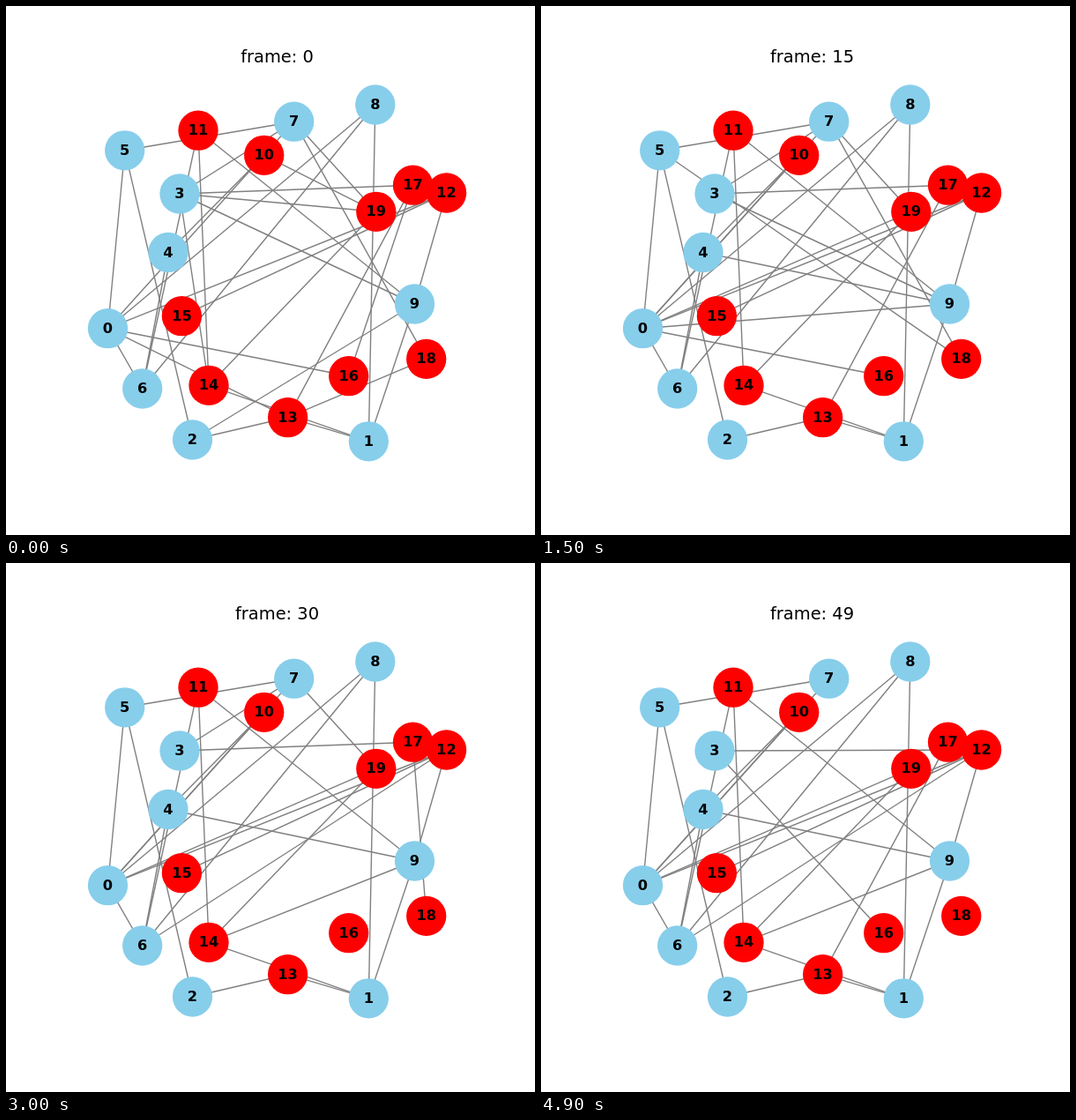
An HTML page with a canvas for the animation above (5000 ms loop, 600x600 px).

```html
<!DOCTYPE html>
<html lang="en">
<head>
<meta charset="utf-8">
<title>Rewiring network</title>
<style>
  html, body { margin: 0; width: 100%; height: 100%; overflow: hidden; background: #fff; }
  canvas { display: block; }
</style>
</head>
<body>
<canvas id="stage" width="600" height="600"></canvas>
<script>
const ctx = document.getElementById('stage').getContext('2d');
const STEP = 100, STEPS = 50, RADIUS = 22.65;

const nodes = [
  [115.5, 365.7], [411.3, 493.8], [211.5, 492], [197, 213], [184, 279.5],
  [134.7, 163.8], [154.7, 434], [326.7, 131.2], [418.8, 112], [463.5, 338],
  [292.7, 169.3], [218, 141.2], [499.6, 212], [319.6, 466.7], [230, 430.3],
  [199.4, 351.7], [388.7, 419.7], [461.5, 203.2], [476.7, 400.4], [419.8, 233.3]
];

// The starting graph, drawn as walks from node to node
const walks = [
  [15, 12, 0, 5, 7, 18, 13, 17],
  [12, 9, 11, 6, 4, 10, 19, 3, 7, 0],
  [5, 2, 13, 0, 6, 8],
  [2, 9, 3, 14, 1, 8, 0, 16, 17, 3],
  [9, 1, 13],
  [7, 19, 14, 11]
];

// Removed edge and, for most, the edge that takes its place
const rewirings = [
  ['3-19', '0-19'], ['13-18', '5-18'], ['0-13', '0-9'], ['2-9', '4-9'],
  ['16-17'], ['3-14'], ['10-19', '0-10'], ['0-9'], ['0-16', '6-12'],
  ['13-17', '17-18'], ['5-18'], ['3-9', '9-14'], ['7-18'], ['7-19'],
  ['17-18', '13-17'], ['3-17', '3-12'], ['3-7', '3-16']
];

const edgeName = (a, b) => `${Math.min(a, b)}-${Math.max(a, b)}`;
const startEdges = walks.flatMap(walk => walk.slice(1).map((b, i) => edgeName(walk[i], b)));

// Rewirings come at a gently slowing pace
const rewireStep = i => Math.floor(1.13 * (i + 1) ** 1.28);

function edgesAt(step) {
  const edges = new Set(startEdges);
  rewirings.forEach(([removed, added], i) => {
    if (rewireStep(i) > step) return;
    edges.delete(removed);
    if (added) edges.add(added);
  });
  return edges;
}

function label(text, x, y, font) {
  ctx.font = `${font} "DejaVu Sans", sans-serif`;
  ctx.fillStyle = '#000';
  ctx.fillText(text, x, y);
}

function draw(step) {
  ctx.fillStyle = '#fff';
  ctx.fillRect(0, 0, 600, 600);

  ctx.strokeStyle = '#808080';
  ctx.lineWidth = 1.39;
  for (const edge of edgesAt(step)) {
    const [a, b] = edge.split('-');
    ctx.beginPath();
    ctx.moveTo(...nodes[a]);
    ctx.lineTo(...nodes[b]);
    ctx.stroke();
  }

  nodes.forEach(([x, y], i) => {
    ctx.fillStyle = i < 10 ? '#87ceeb' : '#f00';
    ctx.beginPath();
    ctx.arc(x, y, RADIUS, 0, 2 * Math.PI);
    ctx.fill();
  });

  ctx.textAlign = 'center';
  nodes.forEach(([x, y], i) => label(i, x, Math.round(y) + 5, 'bold 16.2px'));
  label(`frame: ${step}`, 307.5, 64, '19.44px');
}

let shown = -1;
function tick() {
  const step = Math.floor(performance.now() / STEP) % STEPS;
  if (step !== shown) draw(shown = step);
  requestAnimationFrame(tick);
}
tick();
</script>
</body>
</html>
```
